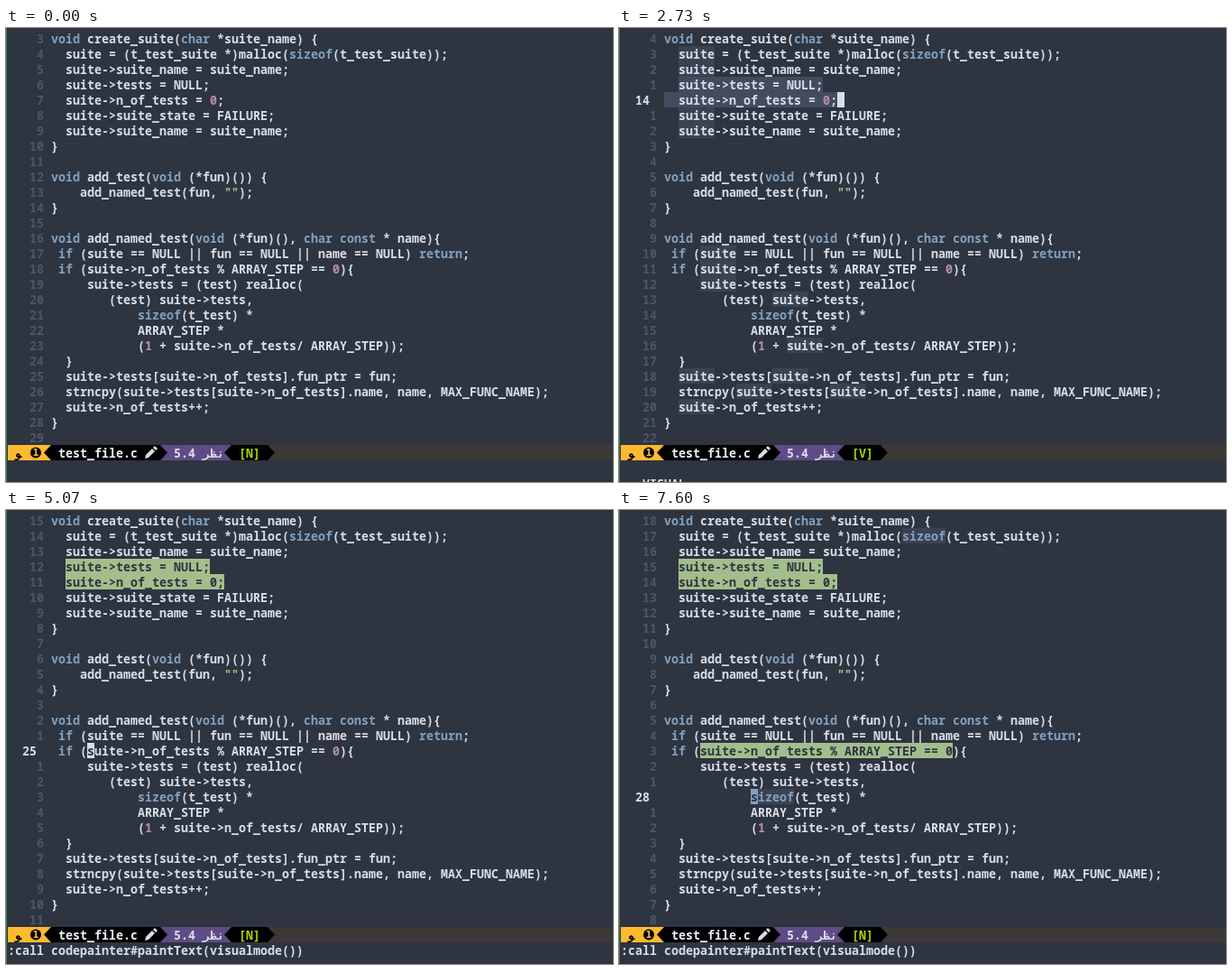
These frames come from a looping animation (673 by 503 pixels, 8 s). An HTML page with a canvas:

```html
<!DOCTYPE html>
<html>
<head>
<meta charset="utf-8">
<style>
html, body { margin: 0; width: 673px; height: 503px; overflow: hidden; background: #2e3440; }
canvas { display: block; }
</style>
</head>
<body>
<canvas id="stage" width="673" height="503"></canvas>
<script>
const ctx = document.getElementById('stage').getContext('2d');
const LOOP = 8000, CELL = 8, LINE = 17, CODE_X = 50, FIRST_LINE = 10;
const FONT = '600 13.333px "Noto Sans Mono", monospace';
const C = {
  bg: '#2e3440', text: '#d8dee9', keyword: '#81a1c1', number: '#b48ead', green: '#a3be8c',
  gutter: '#4c566a', word: '#3b4252', visual: '#434c5e', edge: '#3f7d43',
  bar: '#3c3836', orange: '#fdba2f', purple: '#5f4b85', lime: '#afd700'
};

const code = `void create_suite(char *suite_name) {
  suite = (t_test_suite *)malloc(sizeof(t_test_suite));
  suite->suite_name = suite_name;
  suite->tests = NULL;
  suite->n_of_tests = 0;
  suite->suite_state = FAILURE;
  suite->suite_name = suite_name;
}

void add_test(void (*fun)()) {
    add_named_test(fun, "");
}

void add_named_test(void (*fun)(), char const * name){
 if (suite == NULL || fun == NULL || name == NULL) return;
 if (suite->n_of_tests % ARRAY_STEP == 0){
     suite->tests = (test) realloc(
        (test) suite->tests,
            sizeof(t_test) *
            ARRAY_STEP *
            (1 + suite->n_of_tests/ ARRAY_STEP));
  }
  suite->tests[suite->n_of_tests].fun_ptr = fun;
  strncpy(suite->tests[suite->n_of_tests].name, name, MAX_FUNC_NAME);
  suite->n_of_tests++;
}
`.split('\n');

// Each step lists only what changes from the one before.
const steps = [
  { at: 0, row: -3, col: 0, word: '', mode: 'N', anchor: null, painted: 0 },
  { at: 300, row: -2 },
  { at: 470, row: -1 },
  { at: 670, row: 0 },
  { at: 770, word: 'void' },
  { at: 1330, row: 3, word: '' },
  { at: 1470, col: 2 },
  { at: 1570, word: 'suite' },
  { at: 1970, mode: 'V', anchor: [3, 2] },
  { at: 2070, row: 4 },
  { at: 2730, col: 24 },
  { at: 3130, row: 3, col: 2, mode: 'N', anchor: null, painted: 1 },
  { at: 3630, row: 4 },
  { at: 4270, row: 5 },
  { at: 4300, row: 6 },
  { at: 4330, row: 7, col: 0 },
  { at: 4370, row: 8 },
  { at: 4400, row: 9, col: 2 },
  { at: 4470, row: 11, col: 0 },
  { at: 4530, row: 13, col: 2 },
  { at: 4600, row: 15 },
  { at: 4900, word: '' },
  { at: 5070, col: 5 },
  { at: 5170, word: 'suite' },
  { at: 5330, mode: 'V', anchor: [15, 5] },
  { at: 5870, col: 39 },
  { at: 6900, col: 5, mode: 'N', anchor: null, painted: 2 },
  { at: 6930, row: 16 },
  { at: 7230, row: 17 },
  { at: 7370, row: 18 },
  { at: 7400, word: '' },
  { at: 7500, col: 12 },
  { at: 7600, word: 'sizeof' }
];

const stateAt = time => Object.assign({}, ...steps.filter(step => step.at <= time));
const rowTop = row => 3 + LINE * row;

function box(x, y, w, h, color) {
  ctx.fillStyle = color;
  ctx.fillRect(x, y, w, h);
}

function write(text, x, row, color) {
  ctx.fillStyle = color;
  ctx.fillText(text, x, rowTop(row) + 14);
}

function shape(points, color) {
  ctx.fillStyle = color;
  ctx.beginPath();
  points.forEach(([x, y]) => ctx.lineTo(x, y));
  ctx.fill();
}

function mark(cells, pattern, style) {
  return line => {
    for (const m of line.matchAll(pattern))
      for (let i = 0; i < m[0].length; i++) Object.assign(cells[m.index + i], style);
  };
}

function isPainted(painted, row, col) {
  return (painted > 0 && (row === 3 || row === 4) && col >= 2) ||
         (painted > 1 && row === 15 && col >= 5 && col < 40);
}

function isSelected({ anchor, row, col }, r, c) {
  if (!anchor) return false;
  const order = (a, b) => a * 1000 + b;
  return order(r, c) >= order(...anchor) && order(r, c) < order(row, col);
}

function drawCode(state) {
  code.forEach((line, row) => {
    const cells = [...line + ' '].map(char => ({ char, fg: C.text, bg: C.bg }));
    mark(cells, /\b(void|char|const|sizeof|if|return)\b/g, { fg: C.keyword })(line);
    mark(cells, /\b\d+\b/g, { fg: C.number })(line);
    mark(cells, /""/g, { fg: C.green })(line);
    if (state.word) mark(cells, new RegExp(`\\b${state.word}\\b`, 'g'), { bg: C.word })(line);

    cells.forEach((cell, col) => {
      let { char, fg, bg } = cell;
      if (col < line.length) {
        if (isPainted(state.painted, row, col)) [fg, bg] = [C.bg, C.green];
        if (isSelected(state, row, col)) bg = C.visual;
      }
      if (row === state.row && col === state.col)
        [fg, bg] = [bg === C.green ? C.green : C.bg, fg];
      const x = CODE_X + col * CELL;
      if (bg !== C.bg) box(x, rowTop(row), CELL, LINE, bg);
      if (char !== ' ') write(char, x, row, fg);
    });

    const distance = Math.abs(row - state.row);
    if (distance) write(String(distance).padStart(3), 18, row, C.gutter);
    else write(String(FIRST_LINE + row), 18, row, C.text);
  });
  if (state.row === -1) box(CODE_X, 0, CELL, 3, C.text);
}

function drawStatus(mode) {
  const top = rowTop(27), mid = top + LINE / 2, end = top + LINE;
  const capsule = (left, right) => shape(
    [[left, mid], [left + 8, top], [right - 8, top], [right, mid], [right - 8, end], [left + 8, end]], '#000');
  box(2, top, 671, LINE, C.bar);
  box(2, top, 48, LINE, C.orange);
  box(170, top, 80, LINE, C.purple);
  capsule(42, 179);
  capsule(242, 298);

  write('ﻮ', 10, 27, '#000');
  ctx.fillStyle = '#000';
  ctx.beginPath();
  ctx.arc(33, mid, 6, 0, Math.PI * 2);
  ctx.fill();
  ctx.font = 'bold 10px "DejaVu Sans", sans-serif';
  ctx.fillStyle = C.orange;
  ctx.fillText('1', 29.6, mid + 3.7);
  ctx.font = FONT;

  write('test_file.c', 58, 27, '#eceff4');
  shape([[154, 477], [155, 473], [162, 466], [165, 469], [158, 476]], C.text);
  shape([[163, 465], [165, 463], [168, 466], [166, 468]], C.text);
  write('5.4', 186, 27, C.text);
  ctx.textAlign = 'right';
  ctx.font = 'bold 13.333px "DejaVu Sans Mono", monospace';
  write('نظر', 242, 27, C.text);
  ctx.textAlign = 'left';
  ctx.font = FONT;
  write(`[${mode}]`, 258, 27, C.lime);
}

function draw(time) {
  const state = stateAt(time);
  box(0, 0, 673, 503, C.bg);
  ctx.font = FONT;
  drawCode(state);
  drawStatus(state.mode);
  if (state.painted) write(':call codepainter#paintText(visualmode())', 2, 28, C.text);
  if (state.mode === 'V') write('-- VISUAL --', 2, 29, C.text);
  box(0, 0, 1, 503, C.edge);
}

const start = performance.now();
function tick() {
  draw((performance.now() - start) % LOOP);
  requestAnimationFrame(tick);
}
tick();
</script>
</body>
</html>
```
